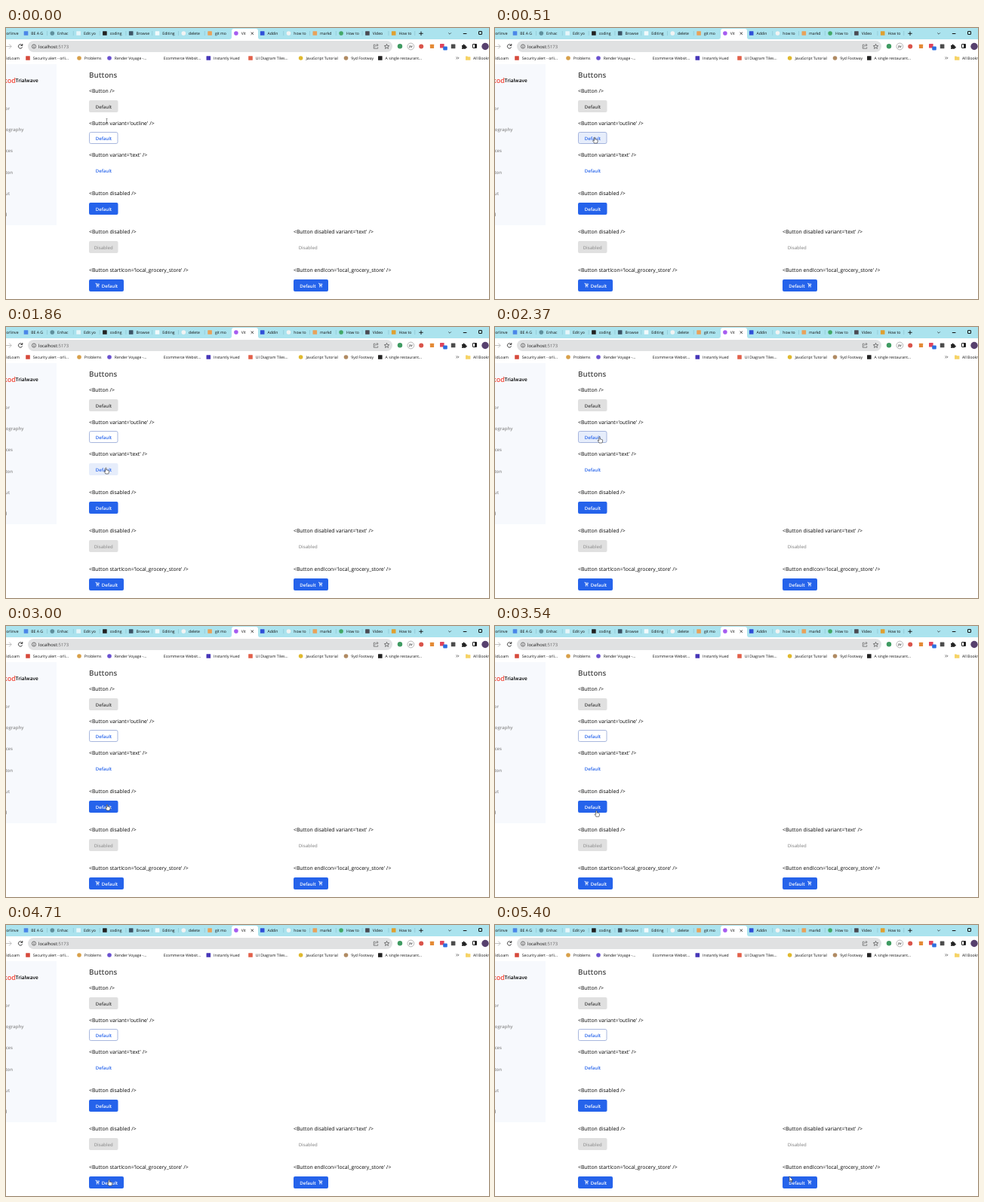
These frames come from a looping animation (640 by 360 pixels, 5.43 s). An HTML page:

```html
<!DOCTYPE html>
<html lang="en">
<head>
<meta charset="utf-8">
<title>Buttons</title>
<style>
html, body { margin: 0; width: 100%; height: 100%; overflow: hidden; background: #fff; }
svg { display: block; width: 100vw; height: 100vh; }
text { font-family: "Open Sans", "Noto Sans", sans-serif; white-space: pre; text-rendering: geometricPrecision; }
</style>
</head>
<body>
<svg id="stage" viewBox="0 0 640 360"></svg>
<script>
const LOOP = 5430, STEP = 30, TALL = 16;
const BLUE = '#2563eb', INK = '#000', GREY = '#8f8f8f';
const stage = document.getElementById('stage');

function add(tag, attrs, parent = stage) {
  const node = document.createElementNS('http://www.w3.org/2000/svg', tag);
  for (const key in attrs) node.setAttribute(key, attrs[key]);
  parent.appendChild(node);
  return node;
}
const box = (x, y, width, height, fill, rx = 0, more = {}) =>
  add('rect', { x, y, width, height, fill, rx, ...more });
const dot = (cx, cy, r, fill, more = {}) => add('circle', { cx, cy, r, fill, ...more });
const line = (d, stroke = '#333', width = 0.8, more = {}) =>
  add('path', { d, stroke, 'stroke-width': width, fill: 'none', ...more });
function label(x, y, str, size, fill = INK, weight = 400, anchor = 'start') {
  const node = add('text', { x, y, 'font-size': size, fill, 'font-weight': weight, 'text-anchor': anchor });
  node.textContent = str;
  return node;
}
// Plain stand-in for a site icon: 'o' is round, 's' is square
function icon(kind, x, y, fill, r = 2.8) {
  if (kind === 'o') dot(x, y, r, fill);
  else box(x - r, y - r, r * 2, r * 2, fill, 0.5);
}

// Tab strip
box(0, 0, 640, 15, '#abe3ee');
add('path', { d: 'M296 15Q299 15 299 12V4Q299 1 302 1H331Q334 1 334 4V12Q334 15 337 15Z', fill: '#fff' });
label(16.5, 9, 'orlinve', 5.1, '#111', 500, 'end');
const tabs = [
  ['s', '#4a86e8', 'BE A G'], ['o', '#5f8f9c', 'Enhac'], ['s', '#e8f6fa', 'Edit yo'],
  ['s', '#222', 'coding'], ['s', '#3d5566', 'Browse'], ['s', '#f2fafc', 'Editing'],
  ['o', '#f3f3f3', 'delete'], ['s', '#e9a25a', 'git mo'], ['o', '#a65cf0', 'Vit'],
  ['s', '#2f50d8', 'Addin'], ['o', '#f3f3f3', 'how to'], ['s', '#e9a25a', 'markd'],
  ['o', '#43a868', 'How to'], ['s', '#4a4a52', 'Video'], ['s', '#e0a030', 'How to']
];
tabs.forEach(([kind, fill, title], i) => {
  const x = 26.5 + i * 34.8;
  icon(kind, x, 7, fill);
  label(x + 6.8, 9, title, 5.1, '#111', 500);
  if (i !== 8 && i !== 7) line(`M${x + 28} 4V10`, '#7fb9c6', 0.5);
});
line('M324.6 5.5l3.4 3.4M328 5.5l-3.4 3.4', '#222', 0.8);
line('M547.3 7.3h5.4M550 4.6v5.4', '#111', 0.9);
line('M586.2 6.4l1.8 1.8l1.8-1.8', '#222', 0.7);
line('M605.8 7.5h4.6', '#111', 1);
box(626.5, 4.5, 4, 4, 'none', 0.3, { stroke: '#111', 'stroke-width': 1 });

// Toolbar
line('M0 24.5h7M4.2 21.5l3 3l-3 3', '#b0b0b0', 0.8);
line('M21.4 23a2.7 2.7 0 1 0 .2 2.4M21.8 21v2.4h-2.4', '#222', 0.9);
box(29, 17, 483, 15, '#e0e1e2', 7.5);
dot(37, 24.5, 2.6, 'none', { stroke: '#444', 'stroke-width': 0.7 });
line('M37 24v2M37 22.7v.6', '#444', 0.7);
label(43, 26.7, 'localhost:', 5.9, '#111');
label(69.6, 26.7, '5173', 5.9, '#606060');
line('M489.5 22.2h-2.2v5h5.4v-1.8M488.8 25.5c.2-2 1.4-2.8 3.8-2.8M491.4 21.2l1.8 1.5l-1.8 1.5', '#444', 0.6);
line('M504.5 21.4l.9 2.1l2.3.2l-1.8 1.5l.6 2.2l-2-1.2l-2 1.2l.6-2.2l-1.8-1.5l2.3-.2z', '#333', 0.6);
icon('o', 522, 24.3, '#3f9b62', 3.2);
dot(536.3, 24.5, 4.4, '#fff', { stroke: '#888', 'stroke-width': 0.6 });
label(536.3, 26, 'JW', 3.8, '#333', 600, 'middle');
icon('o', 550.2, 24.4, '#d9534a', 3);
icon('s', 564.5, 24.4, '#e48a35', 2.6);
icon('s', 577.8, 23.7, '#e0455c', 2.8);
box(579.2, 24.6, 5.6, 4.8, '#2c6fe0', 1);
icon('s', 592.6, 24.4, '#4c4c4c', 2.8);
add('path', { d: 'M604 23h1.6a1.1 1.1 0 1 1 2 0h1.6v1.6a1.1 1.1 0 1 1 0 2v1.2h-5.2v-1.6a1.1 1.1 0 0 0 0-1.8z', fill: '#222' });
box(618.5, 21.5, 5, 5, '#fff', 0.3, { stroke: '#222', 'stroke-width': 1 });
box(621, 21.5, 2.5, 5, '#222');
dot(635, 24.5, 4.7, '#57406e');

// Bookmark bar
label(18, 41.8, 'VidLoam', 5.1, '#111', 500, 'end');
const marks = [
  ['s', 29, '#d64a3c', 'Security alert - orli...'], ['o', 97, '#d8a04a', 'Problems'],
  ['o', 137, '#6a50d0', 'Render Voyage -...'], ['', 202, '', 'Ecommerce Websit...'],
  ['s', 268.3, '#4636b8', 'Instantly Hued'], ['s', 324, '#e2604a', 'UI Diagram Tiles...'],
  ['o', 390.6, '#e0b92e', 'JavaScript Tutorial'], ['o', 450.5, '#b08a62', '9yd Footway'],
  ['s', 495.8, '#222', 'A single restaurant...']
];
for (const [kind, x, fill, title] of marks) {
  if (kind) icon(kind, x, 40, fill);
  label(x + 6.8, 41.8, title, 5.1, '#111', 500);
}
line('M596.6 38.4l1.4 1.5l-1.4 1.5M598.6 38.4l1.4 1.5l-1.4 1.5', '#222', 0.6);
add('path', { d: 'M609 37.4h2.4l.8.8h3.2v4.6h-6.4z', fill: '#f6d365' });
label(619, 41.8, 'All Bookmarks', 5.1, '#111', 500);

// Sidebar
box(0, 48, 67, 214, '#f7f9fd');
label(13, 72.6, 'kod', 9.2, '#f4493a', 600, 'end');
label(12.8, 72.3, 'Trialwave', 6.5, INK, 600);
[['Color', 5, 109], ['Typography', 23.5, 137], ['Spaces', 9, 165.3],
 ['Button', 9, 193.5], ['Input', 5, 221.8], ['Grid', 1.5, 249.6]]
  .forEach(([name, x, y]) => label(x, y, name, 6, GREY, 600, 'end'));

// Page
label(110, 66.4, 'Buttons', 9.8, '#4a4a4a', 600);
const captions = [
  [110, 86.3, ''], [110, 128.5, " variant='outline'"], [110, 170.8, " variant='text'"],
  [110, 222, ' disabled'], [110, 273.2, ' disabled'], [381, 273.2, " disabled variant='text'"],
  [110, 324.4, " startIcon='local_grocery_store'"], [381, 324.4, " endIcon='local_grocery_store'"]
].map(([x, y, props]) => label(x, y, `<Button${props} />`, 6.85).getBBox());

function cart(x, y) {
  line(`M${x} ${y}h.9l1.1 2.5h2.2l.9-1.8M${x + 2} ${y + 2.5}l-.6.9h3.3M${x + 1.2} ${y + 0.9}h3.7`, '#fff', 0.8);
  dot(x + 1.8, y + 4.7, 0.6, '#fff');
  dot(x + 4.3, y + 4.7, 0.6, '#fff');
}

// x, y, width, fill, hover fill, text x, text colour, caption, border
const buttons = [
  [110, 96, 38.5, '#e0e0e0', '#aeaeae', 129.5, '#3f3f3f', 'Default'],
  [110, 138, 38.5, '#fff', '#e6edfb', 129.5, BLUE, 'Default', '#92a5d6'],
  [110, 181, 38.5, '#fff', '#e6edfb', 129.5, BLUE, 'Default'],
  [110, 232, 38.5, BLUE, BLUE, 129.5, '#fff', 'Default'],
  [110, 283, 38.5, '#e0e0e0', '#aeaeae', 129.2, '#9a9a9a', 'Disabled'],
  [381, 283, 38.5, '#fff', '#fff', 400.2, '#9a9a9a', 'Disabled'],
  [110, 334, 46, BLUE, BLUE, 137.5, '#fff', 'Default'],
  [381, 334, 46, BLUE, BLUE, 400, '#fff', 'Default']
].map(([x, y, width, fill, hover, tx, color, caption, border]) => {
  const edge = border ? 0.5 : 0;
  const rect = box(x + edge, y + edge, width - edge * 2, TALL - edge * 2, fill, 2,
    border ? { stroke: border, 'stroke-width': 0.8 } : {});
  label(tx, y + 10.5, caption, 6, color, 600, 'middle');
  return { x, y, width, height: TALL, fill, hover, rect };
});
cart(118.5, 339.2);
cart(414, 339.2);

// Pointers
const shape = (d, attrs) => add('path', { d, 'stroke-linejoin': 'round', ...attrs });
const solid = { fill: '#fff', stroke: '#222', 'stroke-width': 0.6 };
const pointers = {
  arrow: shape('M0 0V7L1.6 5.6L2.7 8L3.7 7.5L2.7 5.2H4.9Z', solid),
  hand: shape('M-.7 .5Q0-.4 .7 .5V3Q1.5 2.6 1.9 3.2Q2.7 2.9 3 3.5Q3.9 3.3 4 4.2V6Q3.9 7 3.3 8H-.5Q-1 6.8-2.3 5.2Q-2.4 4.3-1.6 4.4L-.7 5.2Z', solid),
  beam: shape('M-1-3H1M0-3V3M-1 3H1', { fill: 'none', stroke: '#444', 'stroke-width': 0.5 })
};

// time, x, y
const path = [
  [0, 133.5, 123.5], [120, 132.5, 125], [390, 132, 143], [510, 132, 145], [930, 133, 146],
  [1200, 128, 160], [1350, 127.5, 165], [1590, 130, 181], [1770, 132, 187], [1980, 133, 187],
  [2220, 138, 148], [2370, 138.5, 146], [2520, 138, 149], [2760, 135, 188], [3000, 134, 237],
  [3450, 134, 239], [3840, 137, 285], [4050, 137.5, 287], [4350, 137, 289],
  [4620, 136, 338], [4860, 138, 339], [5190, 330, 334], [5400, 390, 333.8], [5430, 390, 333.8]
];
function pointAt(time) {
  const i = Math.max(1, path.findIndex(p => p[0] >= time));
  const [t0, x0, y0] = path[i - 1], [t1, x1, y1] = path[i];
  const k = (time - t0) / (t1 - t0), ease = k * k * (3 - 2 * k);
  return [x0 + (x1 - x0) * ease, y0 + (y1 - y0) * ease];
}
const inside = (x, y, r) => x >= r.x && x <= r.x + r.width && y >= r.y && y <= r.y + r.height;

function draw(now) {
  const time = Math.floor((now % LOOP) / STEP) * STEP;
  const [x, y] = pointAt(time);
  let kind = captions.some(r => inside(x, y, r)) ? 'beam' : 'arrow';
  for (const b of buttons) {
    const hit = inside(x, y, b);
    if (hit) kind = 'hand';
    b.rect.setAttribute('fill', hit ? b.hover : b.fill);
  }
  for (const name in pointers) {
    pointers[name].setAttribute('transform', `translate(${x.toFixed(2)} ${y.toFixed(2)})`);
    pointers[name].setAttribute('visibility', name === kind ? 'visible' : 'hidden');
  }
}
const start = performance.now();
function tick() {
  draw(performance.now() - start);
  requestAnimationFrame(tick);
}
tick();
</script>
</body>
</html>
```
